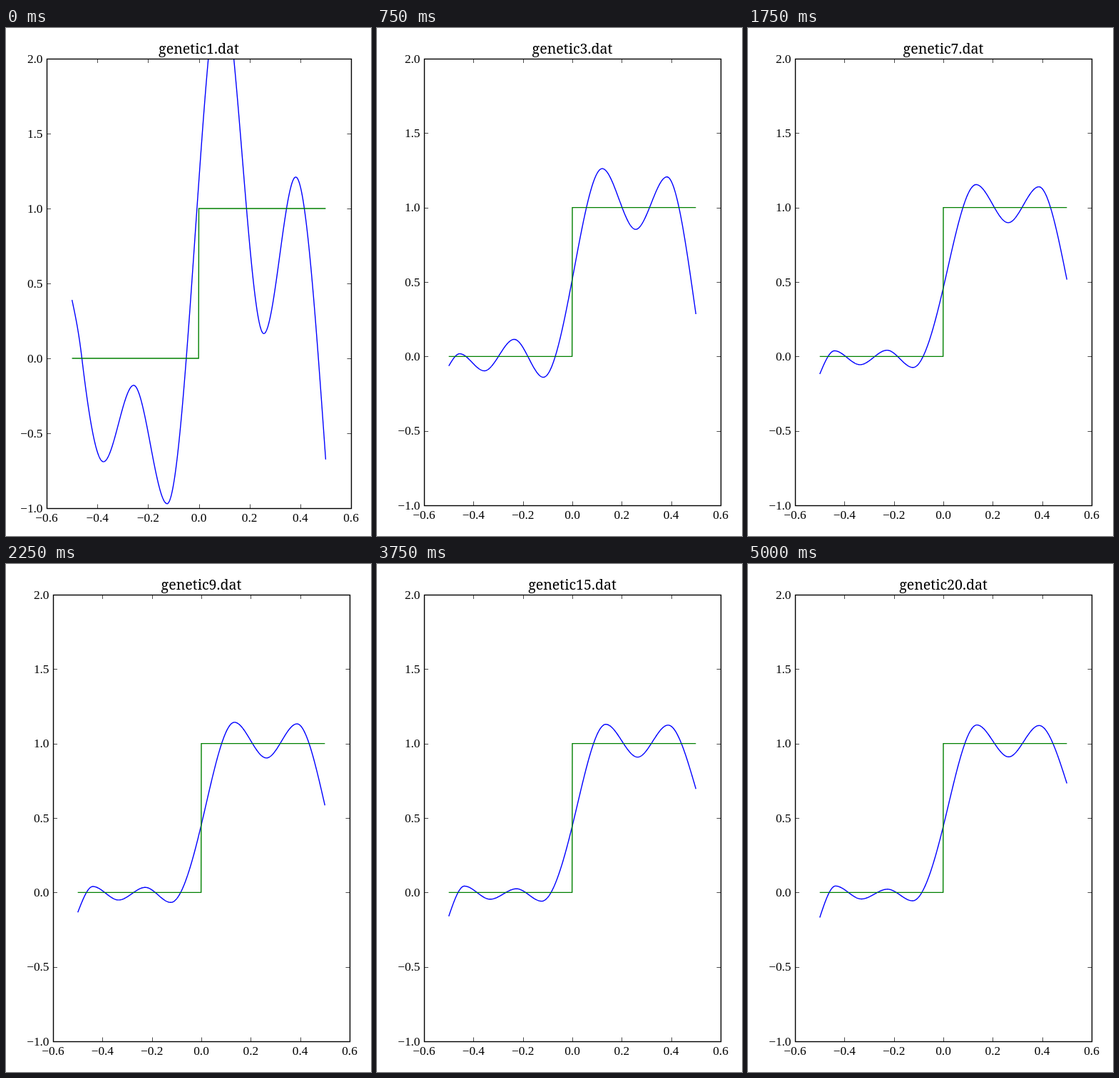
Animation of 512x712 px, one loop 5250 ms. Source, as an HTML page with a canvas:

```html
<!DOCTYPE html>
<html lang="en">
<head>
<meta charset="utf-8">
<title>Curve fit by generation</title>
<style>
  html, body { margin: 0; width: 100%; height: 100%; overflow: hidden; background: #fff; }
  canvas { display: block; }
</style>
</head>
<body>
<canvas id="plot" width="512" height="712"></canvas>
<script>
const ctx = document.getElementById('plot').getContext('2d');
const LOOP = 5250, STEP = 250;

// Turning points of the fit, in data units: first guess, second guess, settled shape.
const first = [[-0.5, 0.39], [-0.461, 0], [-0.376, -0.69], [-0.257, -0.18], [-0.125, -0.97],
  [0, 1.18], [0.087, 2.51], [0.256, 0.165], [0.382, 1.21], [0.5, -0.675]];
const second = [[-0.5, -0.044], [-0.483, -0.017], [-0.39, -0.17], [-0.248, 0.244], [-0.107, -0.256],
  [0, 0.625], [0.1, 1.452], [0.245, 0.774], [0.376, 1.324], [0.5, 0.198]];
const settled = [[-0.5, -0.175], [-0.435, 0.045], [-0.33, -0.04], [-0.225, 0.015], [-0.125, -0.05],
  [0, 0.44], [0.137, 1.115], [0.265, 0.915], [0.388, 1.115], [0.5, 0.76]];

// The ripples settle quickly, the two ends more slowly.
function turningPoints(generation) {
  if (generation === 1) return first;
  const ripple = (generation - 1) ** -1.2;
  const end = Math.exp((2 - generation) / 6);
  return settled.map((point, i) => {
    const rest = i % (settled.length - 1) ? ripple : end;
    return point.map((v, axis) => v + (second[i][axis] - v) * rest);
  });
}

// Smooth cubic curve through the points, level at every turn.
function smooth(points) {
  const last = points.length - 1;
  const gap = i => points[i + 1][0] - points[i][0];
  const secant = i => (points[i + 1][1] - points[i][1]) / gap(i);
  const slope = points.map((_, i) => {
    if (i === 0 || i === last || secant(i - 1) * secant(i) < 0) return 0;
    return 1.5 * (secant(i - 1) / gap(i - 1) + secant(i) / gap(i)) / (1 / gap(i - 1) + 1 / gap(i));
  });
  slope[0] = (3 * secant(0) - slope[1]) / 2;
  slope[last] = (3 * secant(last - 1) - slope[last - 1]) / 2;

  const path = [];
  for (let i = 0; i < last; i++) {
    const [x, y] = points[i], h = gap(i);
    for (let u = 0; u <= 1; u += 1 / 64) {
      const v = 1 - u;
      path.push([x + u * h,
        v * v * ((1 + 2 * u) * y + u * h * slope[i]) +
        u * u * ((1 + 2 * v) * points[i + 1][1] - v * h * slope[i + 1])]);
    }
  }
  return path;
}

const snap = v => Math.round(v) + 0.5;
const label = v => v.toFixed(1).replace('-', '\u2212');

function line(points, color, width) {
  ctx.beginPath();
  points.forEach(([x, y]) => ctx.lineTo(x, y));
  ctx.strokeStyle = color;
  ctx.lineWidth = width;
  ctx.stroke();
}

function draw(generation) {
  const [left, right, top, bottom] = generation === 1 ? [57, 484, 43, 673] : [66, 482, 43, 669];
  const mid = (left + right) / 2;
  const px = v => mid + v * (right - left) / 1.2;
  const py = v => bottom - (v + 1) * (bottom - top) / 3;
  const plot = (points, color) => line(points.map(([x, y]) => [px(x), py(y)]), color, 1.4);

  ctx.fillStyle = '#fff';
  ctx.fillRect(0, 0, 512, 712);

  ctx.save();
  ctx.beginPath();
  ctx.rect(left, top, right - left, bottom - top);
  ctx.clip();
  plot(smooth(turningPoints(generation)), '#00f');
  plot([[-0.5, 0], [-0.001, 0], [0, 1], [0.5, 1]], '#008000');
  ctx.restore();

  ctx.fillStyle = '#000';
  ctx.font = '17.3px "Liberation Serif", serif';
  for (let i = 0; i < 7; i++) {
    const value = (i - 3) / 5, x = snap(px(value));
    line([[x, top], [x, top + 6]], '#000', 0.7);
    line([[x, bottom], [x, bottom - 5.5]], '#000', 0.7);
    ctx.textAlign = 'center';
    ctx.fillText(label(value), px(value), bottom + 19);

    const level = i / 2 - 1, y = snap(py(level));
    line([[left, y], [left + 6, y]], '#000', 0.7);
    line([[right, y], [right - 5.5, y]], '#000', 0.7);
    ctx.textAlign = 'right';
    ctx.fillText(label(level), left - 5.5, py(level) + 5.5);
  }
  ctx.strokeStyle = '#000';
  ctx.lineWidth = 1.4;
  ctx.strokeRect(left + 0.5, top + 0.5, right - left, bottom - top);

  ctx.textAlign = 'center';
  ctx.font = '19.6px "Noto Serif", serif';
  ctx.fillText(`genetic${generation}.dat`, mid, 36);
}

function frame() {
  const t = performance.now() % LOOP;
  draw(Math.max(1, Math.floor(t / STEP)));
  requestAnimationFrame(frame);
}
frame();
</script>
</body>
</html>
```
